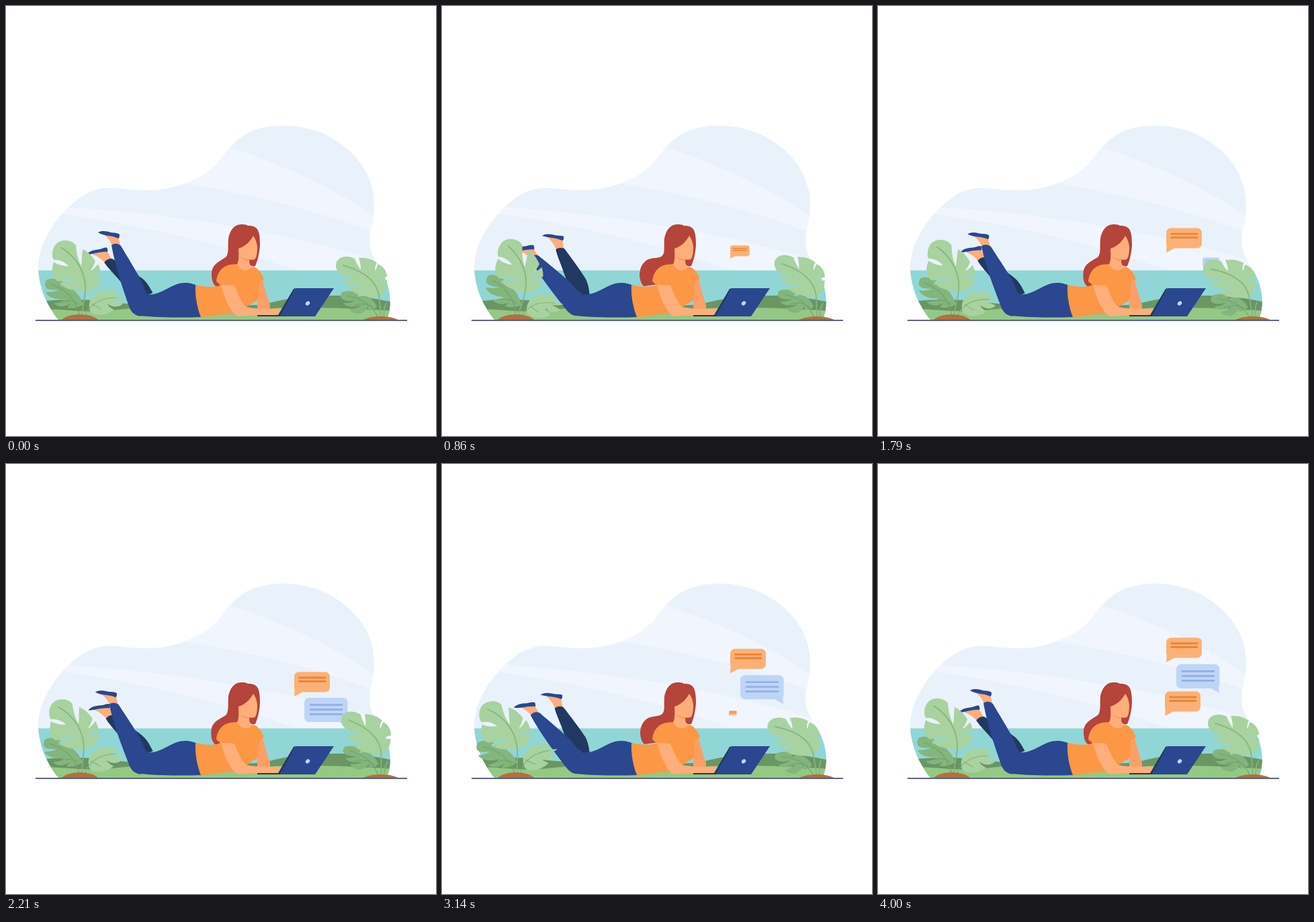
These frames come from a looping animation (640 by 640 pixels, 4.07 s). An HTML page:

```html
<!DOCTYPE html>
<html lang="en">
<head>
<meta charset="utf-8">
<title>Working outdoors</title>
<style>
  html, body { margin: 0; width: 100%; height: 100%; overflow: hidden; background: #fff; }
  svg { display: block; width: 100vw; height: 100vh; }
</style>
</head>
<body>
<svg viewBox="0 0 640 640" xmlns="http://www.w3.org/2000/svg">
  <defs>
    <clipPath id="blob">
      <path d="M48 393C46 352 76 313 104 290C124 274 142 270 160 271C183 273 206 276 230 273C270 267 298 252 315 233C326 221 332 209 345 199C364 183 388 178 414 178C486 178 549 232 548 297C548 320 541 332 541 350C541 376 561 389 568 415C575 440 571 456 566 468H79C61 446 50 422 48 393Z"/>
    </clipPath>
  </defs>

  <g clip-path="url(#blob)">
    <path fill="#e9f2fa" d="M0 150H640V470H0Z"/>
    <g fill="#f1f6fe">
      <path d="M334 211C410 235 490 272 552 316L550 338C470 306 370 281 266 264L290 215Z"/>
      <path d="M88 299C250 310 410 335 552 379V394H435C330 356 200 325 78 308Z"/>
    </g>
    <path fill="#91d6d6" d="M0 393.500H640V470H0Z"/>
    <path fill="#6a9664" d="M40 441C80 436 115 436 150 440C210 448 330 449 385 444C420 434 450 431 490 431C525 431 552 435 580 442V470H40Z"/>
    <path fill="#93c984" d="M40 451C80 450 112 456 145 454C170 452 190 449 210 449C280 450 330 455 385 451C430 447 500 449 580 454V470H40Z"/>
  </g>

  <g id="bubbles"></g>

  <g id="farLeg">
    <path fill="#fdae7a" d="M157 343C162 347 167 353 171 363L182 361C181 355 180 350 181 346Z"/>
    <path fill="#2a478f" d="M149.500 341.500C155 337.500 164 339 170 341C175 342 179 341 182 343C182 346 182 348 180 349C170 344 160 345 149.500 341.500Z"/>
    <path fill="#213860" d="M170 362C174 359 179 359 183 361C191 372 209 397 214 406C218 414 219 422 220 431L200 431C190 420 183 402 180 392C176 380 172 372 170 362Z"/>
  </g>
  <g id="nearLeg">
    <path fill="#fdae7a" d="M144 339C150 343 155 349 158 357L170 355C168 350 168 347 168 342Z"/>
    <path fill="#2a478f" d="M137 337C142 334 150 335 156 337C161 338 165 337 169 340C169 343 169 345 167 346C158 341 146 343 137 337Z"/>
    <path fill="#2a478f" d="M157 356C161 353 167 353 171 357C180 372 196 398 202 410C205 418 207 426 212 430L216 448C214 459 204 463 196 461C188 458 185 453 182 444C178 431 164 395 157 356Z"/>
  </g>
  <path fill="#2a478f" d="M194 437C202 429 210 430 219 429C237 426 248 412 267 412C274 412 279 414 285 416L291 463C258 464 218 464 195 460Z"/>

  <path id="hair" fill="#b5443b"/>
  <path fill="#fc9f66" d="M374 410L382 407C385 420 389 434 393 445L393 452H374Z"/>
  <path fill="#fdae7a" d="M368 342C372 347 374 355 374 360C374 367 373 375 370 377C367 378 364 378 362.500 377C361 383 364 387 368 390C364 398 347 397 342 387C346 383 347 377 346 361C356 358 363 351 368 342Z"/>
  <path fill="#f99a55" d="M349 372C353 376 358 377 362.500 377L362 379C356 379 351 377 349 372Z"/>
  <path fill="#fb9745" d="M282 415C294 418 307 419 320 416L313 410C314 397 321 388 333 385L344 384C349 396 361 396 367 388C375 389 380 397 384 406L377 411C375 422 377 430 374 438C366 443 358 447 356 450L344 459C324 457 308 462 290 463C285 451 281 432 282 415Z"/>
  <path fill="#fdae7a" d="M320 415L340 416C345 427 349 441 358 448C372 451 383 450 391 451C400 450 410 450 413 452L410 459C400 461 372 459 346 462C341 461 337 456 333 449C327 439 323 427 320 415Z"/>

  <path fill="#213860" d="M374 460H405L428 421L431 420L409 462H374Z"/>
  <path fill="#2a478f" d="M431 420H488L460 462H407Z"/>
  <ellipse cx="449" cy="442.500" rx="3.600" ry="2.700" fill="#bfd5f7" transform="rotate(-45 449 442.500)"/>

  <g id="leftPlant">
    <path fill="#83b57d" d="M60 408C68 403 78 407 85 411L80 417C84 415 88 415 91 416C103 423 111 432 115 444C108 449 98 451 91 449L96 443C87 449 76 448 71 442C78 442 84 440 89 436C77 438 62 434 59 426C66 426 73 425 78 423C70 422 58 424 58 414Z"/>
    <path fill="none" stroke="#6fa46b" stroke-width="1.200" d="M67 414C87 421 105 434 110 465M78 441C91 438 101 437 108 444"/>
    <path fill="#a8d29f" d="M88 349C75 349 69 359 69 370C69 374 70 376 71 378C77 377 87 380 93 387C85 387 77 385 71 381C66 396 70 405 77 410C86 407 96 406 105 409C97 411 88 411 80 412C88 423 104 424 119 425C132 424 142 413 141 402C135 405 129 405 125 404C131 402 136 399 141 398C141 393 139 388 137 384C133 389 129 393 124 396C128 391 131 386 133 380C128 372 122 365 114 362C113 370 113 378 112 387C107 378 105 368 104 356C100 351 94 349 88 349Z"/>
    <path fill="none" stroke="#83b57d" stroke-width="1.700" stroke-linecap="round" d="M83 360C105 374 118 396 118 420C118 438 112 451 113 465"/>
    <path fill="#a8d29f" d="M124 449C122 434 136 423 150 422L146 429C150 426 154 423 157 423C161 423 164 424 166 426L160 433C165 432 172 433 177 434C172 437 165 437 160 438C165 439 171 441 174 443C168 449 158 449 151 443C153 448 157 450 161 452C152 460 136 462 128 457C125 455 124 452 124 449Z"/>
    <path fill="none" stroke="#83b57d" stroke-width="1.200" stroke-linecap="round" d="M164 434C144 434 124 441 116 465M128 443C132 446 136 448 141 451"/>
  </g>

  <g id="rightPlant">
    <path fill="#83b57d" d="M500 426C509 423 519 424 526 428L522 434C526 432 530 431 533 430C544 434 550 441 552 448C547 452 542 454 538 453L540 446C536 453 531 457 526 458C519 458 513 455 511 451C518 451 524 449 528 445C518 449 507 449 502 442C509 443 516 441 520 438C509 441 497 437 498 431Z"/>
    <path fill="none" stroke="#6fa46b" stroke-width="1.200" d="M507 431C529 435 546 444 554 465M516 446C528 442 538 442 546 449"/>
    <path fill="#a8d29f" d="M491 388C490 379 497 373 506 373C511 373 515 374 519 376C521 382 525 388 528 393C528 386 527 380 525 375C537 374 545 377 552 382C549 387 549 391 550 395C551 391 552 387 554 384C562 388 567 395 567 403C562 404 559 406 556 410C560 408 564 408 567 408C568 421 562 431 554 433C545 434 534 432 526 430C519 428 514 424 511 419C519 420 527 418 532 414C518 418 504 416 500 408C508 409 515 406 519 402C506 406 493 399 491 388Z"/>
    <path fill="none" stroke="#83b57d" stroke-width="1.700" stroke-linecap="round" d="M502 386C530 394 551 407 555 430C557 445 557 455 558 465M566 442C562 449 562 458 562 465"/>
  </g>

  <g fill="#b3703f">
    <path d="M82 468C92 456 128 456 138 468Z"/>
    <path d="M530 468C543 460 573 460 585 468Z"/>
  </g>
  <path stroke="#47506f" stroke-width="1.700" d="M44 467.800H597"/>
</svg>
<script>
const LOOP = 4070, STEPS = 57, FPS = 14;
const $ = id => document.getElementById(id);
const mix = (a, b, p) => a + (b - a) * p;
const ease = (t, start, dur) => {
  const p = Math.min(1, Math.max(0, (t - start) / dur));
  return p * p * (3 - 2 * p);
};
const spin = (id, deg, x, y) => $(id).setAttribute('transform', `rotate(${deg} ${x} ${y})`);

// x, y: tip of the tail, which is also the centre of growth
const orange = { fill: '#fbb175', ink: '#ed8436', box: [0, -36.5, 53, 30], lines: [-28, -22.5], ends: [7.5, 46],
  tail: 'M1 -15L0 0L13 -7Z' };
const blue = { fill: '#bfd5f7', ink: '#94b2e4', box: [-64, -43, 64.5, 36], lines: [-32.5, -25.5, -18.500], ends: [-55, -8],
  tail: 'M-14 -8L0 0L-1 -14Z' };
const bubbles = [
  { look: orange, x: 429, y: 376, pop: 0.54, lifts: [[1.55, 30], [2.74, 51]] },
  { look: blue, x: 508, y: 391, pop: 1.53, lifts: [[2.74, 50]] },
  { look: orange, x: 427, y: 375, pop: 2.96, lifts: [] }
];

$('bubbles').innerHTML = bubbles.map(({ look }) => {
  const [x, y, w, h] = look.box, [a, b] = look.ends;
  const lines = look.lines.map(v => `M${a} ${v}H${b}`).join('');
  return `<g><rect x="${x}" y="${y}" width="${w}" height="${h}" rx="7" fill="${look.fill}"/>
    <path d="${look.tail}" fill="${look.fill}"/>
    <path d="${lines}" stroke="${look.ink}" stroke-width="2.800" stroke-linecap="round"/></g>`;
}).join('');

// Loose lower curls: two poses, then the fixed part around the head
const curlIn = [328, 373, 321, 379, 306, 383, 306, 399, 306, 409, 309, 416, 314, 418];
const curlOut = [329, 370, 325, 378, 310, 372, 302, 380, 292, 388, 291, 408, 300, 417];

function hairPath(p) {
  const c = curlIn.map((v, i) => mix(v, curlOut[i], p).toFixed(2));
  return `M350 325C340 325 333 334 331 346C330 357 332 366 ${c[0]} ${c[1]}
    C${c[2]} ${c[3]} ${c[4]} ${c[5]} ${c[6]} ${c[7]}
    C${c[8]} ${c[9]} ${c[10]} ${c[11]} ${c[12]} ${c[13]}
    L322 414L345 386L362 384C364 387 367 388 371 387C375 378 377 368 378 356
    C378 344 377 334 372 330C368 327 364 327 360 327C357 325 353 325 350 325Z`;
}

function draw(t) {
  const turn = Math.PI * t;
  const kick = (1 - Math.cos(turn + 0.15 * Math.sin(turn / 2) ** 2)) / 2;

  spin('nearLeg', -20 * kick, 200, 443);
  spin('farLeg', -22 * (1 - kick), 209, 433);
  $('hair').setAttribute('d', hairPath(kick));
  spin('leftPlant', 8.5 * Math.sin(turn / 2), 110, 465);
  spin('rightPlant', 8.7 * Math.sin(turn + 0.15 * Math.sin(turn / 2) ** 2), 557, 465);

  bubbles.forEach((b, i) => {
    const up = b.lifts.reduce((sum, [start, d]) => sum + d * ease(t, start, 0.65), 0);
    const size = ease(t, b.pop, 0.6);
    const g = $('bubbles').children[i];
    g.setAttribute('visibility', size > 0 ? 'visible' : 'hidden');
    g.setAttribute('transform', `translate(${b.x} ${b.y - up}) scale(${size})`);
  });
}

function tick() {
  const step = Math.floor((performance.now() % LOOP + 4) * STEPS / LOOP);
  draw(Math.min(step, STEPS - 1) / FPS);
  requestAnimationFrame(tick);
}
tick();
</script>
</body>
</html>
```
